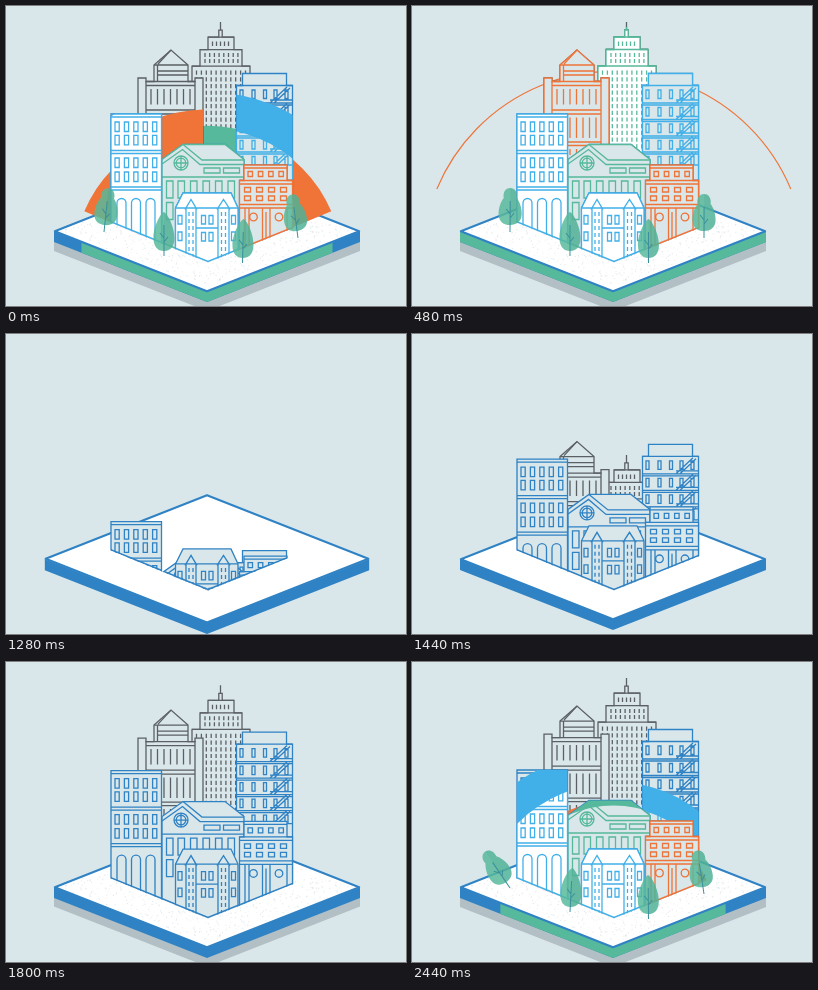
Write an HTML page with a canvas that moves like this. It is 400 by 300 pixels and loops after 2.52 s.

```html
<!DOCTYPE html>
<html lang="en">
<head>
<meta charset="utf-8">
<title>City block</title>
<style>
  html, body { margin: 0; width: 100%; height: 100%; overflow: hidden; background: #d9e6ea; }
  canvas { display: block; width: 100vw; height: 100vh; }
</style>
</head>
<body>
<canvas id="stage"></canvas>
<script>
const LOOP = 2520, CUT = 1120;
const BG = '#d9e6ea', WHITE = '#fff', GRAY = '#5b6064', BLUE = '#2f82c4';
const SKY = '#41b0e8', GREEN = '#57b99b', ORANGE = '#f07338';
const CX = 201.5, CY = 257;

const canvas = document.getElementById('stage');
const ctx = canvas.getContext('2d');
const dpr = window.devicePixelRatio || 1;
canvas.width = 400 * dpr;
canvas.height = 300 * dpr;

const clamp = x => Math.min(1, Math.max(0, x));
const seq = (from, n, step) => Array.from({ length: n }, (_, i) => from + i * step);

// Path string helpers
const rect = (x, y, w, h) => `M${x} ${y}h${w}v${h}h${-w}z`;
const grid = (xs, ys, w, h) => xs.map(x => ys.map(y => rect(x, y, w, h)).join('')).join('');
const bars = (xs, ys, h) => xs.map(x => ys.map(y => `M${x} ${y}v${h}`).join('')).join('');
const rules = (x1, x2, ys) => ys.map(y => `M${x1} ${y}H${x2}`).join('');
const ring = (x, y, r) => `M${x + r} ${y}a${r} ${r} 0 1 0 ${-2 * r} 0a${r} ${r} 0 1 0 ${2 * r} 0z`;
const arch = x => `M${x} 260V197a4.5 4.5 0 0 1 9 0V260`;
const stair = y => `M264 ${y}L281 ${y - 16}M264 ${y - 3}H286M268 ${y}L284 ${y - 15}`;

// rise: [travel, start, rate]; outer and inner: [start, speed] of the colour wave
const buildings = [
  { // skyscraper
    body: 'M186 260V60H194V43.5H202V31H212.8V24H216.2V31H228V43.5H236V60H244V260z',
    lines: 'M214.5 16V24' + rules(202, 228, [31]) + rules(194, 236, [43.5]) + rules(186, 244, [60]) +
      bars(seq(206.5, 5, 4), [35.5], 4.5) + bars(seq(199, 8, 4.7), [47, 53], 4) +
      bars(seq(190.5, 11, 4.9), seq(64.5, 12, 6.7), 4.2),
    base: GRAY, color: GREEN, fill: WHITE, rise: [220, 1341, .0074], outer: [2216, .45], inner: [2262, .32]
  },
  { // pediment block
    body: 'M132 260V72H140V75.5H148V59L165 44L182 59V75.5H189V72H197V260z',
    lines: 'M148 59H182M151.5 59V75.5M165 44L152 58' + rules(151.5, 182, [65, 69]) + rules(140, 189, [75.5, 79.5, 104, 108, 136, 139.5]) +
      'M140 75V260M189 75V260' + bars(seq(145, 7, 6.5), [83, 111.5], 15.5) + bars(seq(145, 7, 6.5), [126, 143], 6),
    base: GRAY, color: ORANGE, fill: BG, rise: [190, 1297, .0076], outer: [2180, .45], inner: [2290, .4]
  },
  { // fire escape block
    body: 'M230.5 260V79.5H236.5V67.5H280.5V79.5H286.5V260z',
    lines: rules(230.5, 286.5, [79.5, 97, 99, 113.5, 115.5, 130, 132, 146, 148]) +
      grid([234, 246, 257.5, 268, 279], [84, 101.5, 118, 134.5, 150.5], 3, 8.5) + [97, 113.5, 130, 146, 162].map(stair).join(''),
    base: BLUE, color: SKY, fill: BG, rise: [160, 1272, .0078], outer: [2114, .42], inner: [2040, .28]
  },
  { // gabled hall
    body: 'M156 260V153.5L177 138.5H219L238 153.5V260z',
    lines: 'M177 138.5L196 154H238M156 158L176.5 143.5L194 158.5H238' + ring(175, 157, 7) + ring(175, 157, 4.8) +
      'M175 150V164M168 157H182' + grid([198, 217.5], [162], 16, 5) + rules(156, 238, [171]) +
      grid([160.5, 172, 184.5, 197, 209.5, 222], [175], 6.5, 17) + rect(160.5, 196.5, 6.5, 17),
    base: BLUE, color: GREEN, fill: BG, foot: true, rise: [115, 1246, .0085], outer: [2150, .5], inner: [2214, .5]
  },
  { // arcade block
    body: 'M105 260V108H155.5V260z',
    lines: rules(105, 155.5, [111, 144.5, 147.5, 181, 184]) + grid(seq(109, 5, 9.4), [116, 129.3, 152, 166], 4.2, 9.5) +
      [111, 125.5, 140].map(arch).join(''),
    base: BLUE, color: SKY, fill: WHITE, foot: true, rise: [130, 1230, .0096], outer: [2052, .43], inner: [2170, .5]
  },
  { // corner shop
    body: 'M233.5 260V174.5H238V159H281V174.5H286.5V260z',
    lines: rules(238, 281, [162]) + grid(seq(242, 4, 10.3), [165.5], 4.5, 5) + rules(233.5, 286.5, [174.5, 178, 198.5, 202]) +
      grid(seq(238.5, 4, 12), [181.5, 190], 6, 4.5) + ring(247.5, 211, 3.8) + ring(273, 211, 3.8) +
      'M239 202V260M243 202V260M256.5 202V260M260 206V260M264 202V260M281 202V260',
    base: BLUE, color: ORANGE, fill: BG, foot: true, rise: [70, 1270, .0095], outer: [2070, .5], inner: [2170, .5]
  },
  { // twin towers house
    body: 'M169.5 260V202L177 187H225L232 202V260z',
    lines: rules(169.5, 232, [202]) + 'M180 260V202L185 193.5L190 202V260M212 260V202L217.5 193.5L223 202V260M179 203.5L185 193.5L191 203.5M211 203.5L217.5 193.5L224 203.5' +
      bars([183, 187, 215.5, 219.5], seq(206, 7, 7), 4) + grid([172, 225.5], [209.5, 226], 4, 8.5) +
      grid([195.5, 203], [209.5, 226.5], 4, 8.5) + rules(190, 212, [222]),
    base: BLUE, color: SKY, fill: WHITE, foot: true, rise: [68, 1200, .011], outer: [2052, .43], inner: [2170, .5]
  }
].map(b => ({ ...b, body: new Path2D(b.body), lines: new Path2D(b.lines) }));

const ground = new Path2D('M104 215.5L202 255.5L288 221');
const aboveGround = new Path2D('M104 0V216.3L202 256.4L288 221.8V0z');
const topFace = new Path2D('M48.8 225.2L201 285.2L353.2 225.2L201 165.2z');
const sides = new Path2D('M48 225.5V236L201 296L354 236V225.5L201 285.5z');
const slab = new Path2D('M48 226V236L201 296L354 236V226L201 166z');

let seed = 7;
const rand = () => (seed = seed * 16807 % 2147483647) / 2147483647;
const specks = Array.from({ length: 900 }, () => {
  const a = rand(), b = rand();
  return [201 + (a - b) * 150, 168 + (a + b) * 57, .5 + rand() * .8];
});

// Half outlines run from the tip down to the foot; mirrored to make a crown
const crown = half => {
  const right = new Path2D(half + 'z'), both = new Path2D(right);
  both.addPath(right, new DOMMatrix([-1, 0, 0, 1, 0, 0]));
  return { right, both };
};
const pear = crown('M0 -44C4 -42 10.5 -29 10.5 -18C10.5 -9 6 -5 0 -5');
const lobed = crown('M0 -44C5 -44 7.5 -39 6.5 -34C9 -31 12 -24 11.5 -17C11 -10 6 -7 0 -7');
const trunk = new Path2D('M0 0V-31M0 -14L4 -19M0 -18L-4 -23');

// x and y of the foot, start, side it springs up from, crown
const trees = [
  [292, 232, 2280, 1, lobed], [98, 226, 2380, -1, lobed], [158, 250, 2130, -1, pear], [236.5, 257, 2105, 1, pear]
];

function backOut(x) {
  const c = 1.3, y = x - 1;
  return 1 + (c + 1) * y ** 3 + c * y ** 2;
}

function disc(r) {
  ctx.moveTo(CX + r, CY);
  ctx.arc(CX, CY, r, 0, Math.PI * 2);
}

function drawPlatform(t) {
  const s = Math.max(0, backOut(clamp((t - 1110) / 290)));
  ctx.save();
  ctx.translate(201, 231);
  ctx.scale(s, s);
  ctx.translate(-201, -231);
  const drop = 9 * (1 - (1 - clamp((t - 1460) / 440)) ** 2);
  if (drop > 0) {
    ctx.save();
    ctx.translate(0, drop);
    ctx.fillStyle = '#b2bfc5';
    ctx.fill(slab);
    ctx.restore();
  }
  ctx.fillStyle = BLUE;
  ctx.fill(sides);
  if (t > 2130) {
    const h = 167 * (1 - Math.exp((2110 - t) / 295));
    ctx.save();
    ctx.beginPath();
    ctx.rect(201 - h, 200, h * 2, 100);
    ctx.clip();
    ctx.fillStyle = GREEN;
    ctx.fill(sides);
    ctx.restore();
  }
  ctx.fillStyle = WHITE;
  ctx.fill(topFace);
  ctx.globalAlpha = .5 * clamp((t - 1440) / 260);
  ctx.fillStyle = '#cbd8dd';
  for (const [x, y, r] of specks) ctx.fillRect(x, y, r, r);
  ctx.globalAlpha = 1;
  ctx.lineWidth = 2;
  ctx.lineJoin = 'round';
  ctx.strokeStyle = BLUE;
  ctx.stroke(topFace);
  ctx.restore();
}

function drawFan(t) {
  if (t < 2310 || t > LOOP + 640) return;
  const r = 197.5 * (1 - Math.exp((2306 - t) / 190));
  const w = Math.min(r - 70, 90 * Math.exp((LOOP - t) / 110));
  if (w <= 0) return;
  const tilt = Math.PI * 22.7 / 180;
  ctx.beginPath();
  ctx.arc(CX + .3, CY, r - w / 2, Math.PI + tilt, -tilt);
  ctx.lineWidth = w;
  ctx.strokeStyle = ORANGE;
  ctx.stroke();
}

function drawCoat(b, color, fill, off) {
  ctx.save();
  ctx.translate(0, off);
  ctx.fillStyle = fill;
  ctx.strokeStyle = color;
  ctx.lineWidth = 1.3;
  ctx.fill(b.body);
  ctx.stroke(b.body);
  ctx.stroke(b.lines);
  if (b.foot) {
    ctx.clip(b.body);
    ctx.translate(0, -off);
    ctx.lineWidth = 1.6;
    ctx.stroke(ground);
  }
  ctx.restore();
}

function drawBuilding(b, t) {
  const [travel, start, rate] = b.rise;
  if (t < start) return;
  const off = travel * Math.exp((start - t) * rate);
  const radius = ([from, speed]) => Math.max(0, (t - from) * speed);
  const ro = radius(b.outer), ri = Math.min(ro, radius(b.inner));
  ctx.save();
  ctx.clip(aboveGround);
  drawCoat(b, b.base, BG, off);
  if (ri > 0) {
    ctx.save();
    ctx.beginPath();
    disc(ri);
    ctx.clip();
    drawCoat(b, b.color, b.fill, off);
    ctx.restore();
  }
  if (ro > ri) {
    ctx.clip(b.body);
    ctx.beginPath();
    disc(ro);
    disc(ri);
    ctx.fillStyle = b.color;
    ctx.fill('evenodd');
  }
  ctx.restore();
}

function drawTree([x, y, start, side, leaf], t) {
  const u = t - start;
  if (u < 0) return;
  const spring = 90 * Math.exp(-u / 100) * Math.cos(u * .013);
  const s = Math.min(1, .5 + u / 120);
  ctx.save();
  ctx.translate(x, y);
  ctx.rotate((side * spring + Math.sin(u / 260) * .5) * Math.PI / 180);
  ctx.scale(s, s);
  ctx.globalAlpha = .84;
  ctx.fillStyle = GREEN;
  ctx.fill(leaf.both);
  ctx.globalAlpha = .1;
  ctx.fillStyle = '#2b7f80';
  ctx.fill(leaf.right);
  ctx.globalAlpha = 1;
  ctx.strokeStyle = '#3a8f9c';
  ctx.lineWidth = 1;
  ctx.stroke(trunk);
  ctx.restore();
}

function frame(now) {
  const time = now % LOOP;
  const t = time < CUT ? time + LOOP : time;
  ctx.setTransform(dpr, 0, 0, dpr, 0, 0);
  ctx.fillStyle = BG;
  ctx.fillRect(0, 0, 400, 300);
  drawPlatform(t);
  drawFan(t);
  buildings.forEach(b => drawBuilding(b, t));
  trees.forEach(tree => drawTree(tree, t));
}

const t0 = performance.now();
function tick() {
  frame(performance.now() - t0);
  requestAnimationFrame(tick);
}
tick();
</script>
</body>
</html>
```
